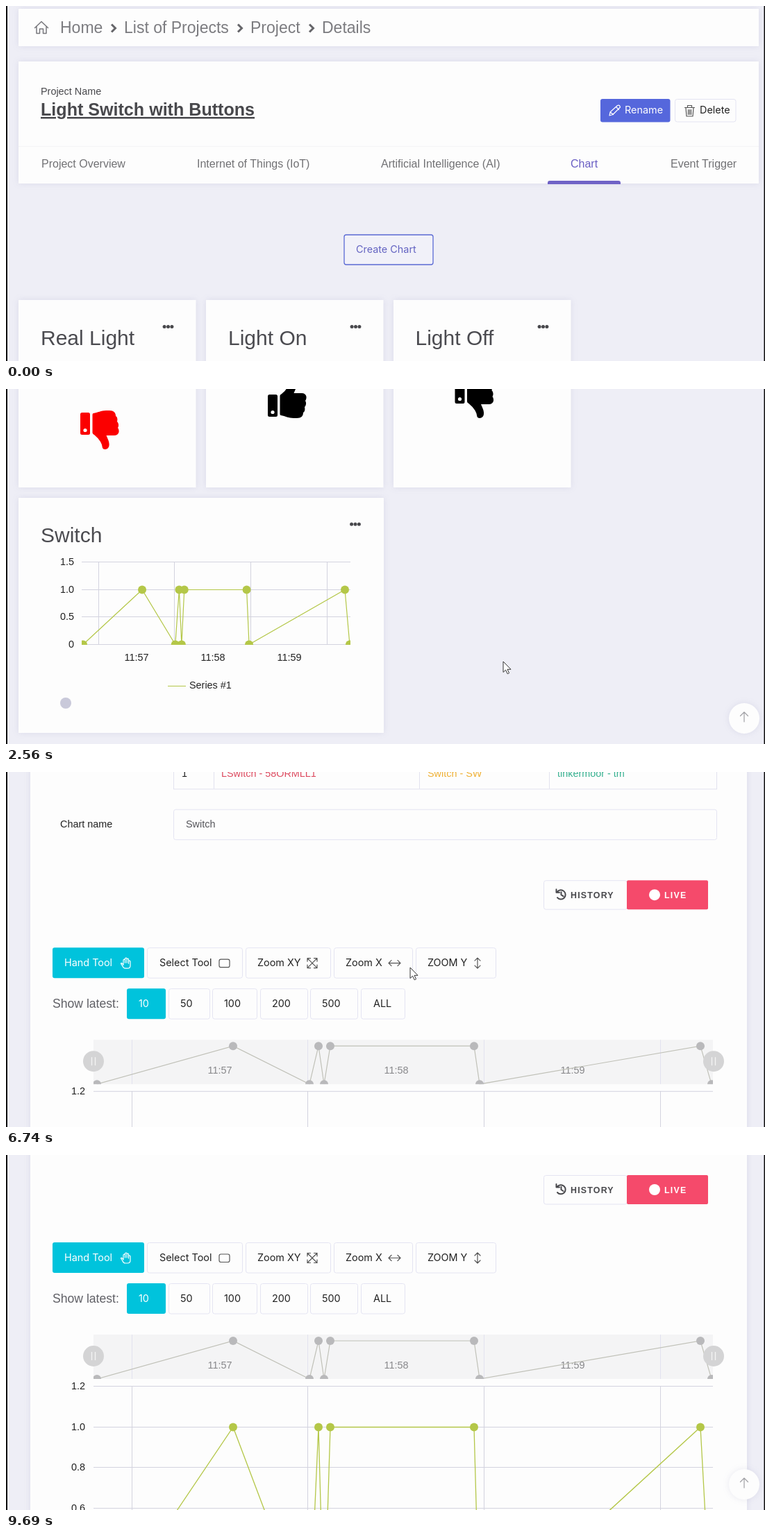
An HTML page for the animation above (9.79 s loop, 1093 by 512 pixels).

```html
<!DOCTYPE html>
<html lang="en">
<head>
<meta charset="utf-8">
<title>Project charts</title>
<style>
html, body { margin: 0; width: 100%; height: 100%; overflow: hidden; background: #eeeef6; }
svg { display: block; width: 1093px; height: 512px; }
text { font-family: "Liberation Sans", Arial, sans-serif; font-size: 14.4px; fill: #222; white-space: pre; }
.ui { font-family: Inter, "Open Sans", sans-serif; font-size: 14.4px; }
.crumb { font-size: 23px; fill: #7c7c80; }
.tab { font-size: 16px; fill: #717174; }
.title { font-size: 30px; fill: #4b4b50; }
.caps { font-weight: bold; font-size: 12.4px; letter-spacing: 1.2px; }
.end { text-anchor: end; }
.mid { text-anchor: middle; }
.card { fill: #fdfdfd; filter: drop-shadow(0 0 5px rgba(90, 90, 150, .12)); }
.box { fill: #fdfdfd; stroke: #e4e4f2; }
.line { fill: none; stroke: #e2e2ef; }
.grid { fill: none; stroke: #d3d3df; }
.icon { fill: none; stroke: #555; stroke-width: 1.2; stroke-linecap: round; stroke-linejoin: round; }

.page, .scroll, .wait, .ready, #spin, #cursor, #up { animation: 9790ms linear infinite; }
#a { animation-name: showA; animation-timing-function: step-end; }
#b { animation-name: showB; animation-timing-function: step-end; }
#a .scroll { animation-name: scrollA; }
#b .scroll { animation-name: scrollB; }
.wait { animation-name: wait; animation-timing-function: step-end; }
.ready { animation-name: ready; animation-timing-function: step-end; }
#spin { animation-name: spin; transform-origin: 456px 243px; }
#cursor { animation-name: cursor; }
#up { animation-name: up; }

@keyframes showA { 0% { opacity: 1 } 48%, 100% { opacity: 0 } }
@keyframes showB { 0% { opacity: 0 } 48%, 100% { opacity: 1 } }
@keyframes wait { 0% { opacity: 0 } 48% { opacity: 1 } 61%, 100% { opacity: 0 } }
@keyframes ready { 0% { opacity: 0 } 61%, 100% { opacity: 1 } }
@keyframes scrollA {
  0%, 9.9% { transform: translateY(0) }
  13.585% { transform: translateY(-152px) }
  24.5%, 100% { transform: translateY(-621px) }
}
@keyframes scrollB {
  0%, 62.3% { transform: translateY(-407px) }
  68.85% { transform: translateY(-74px); animation-timing-function: ease-out }
  73%, 88.5% { transform: translateY(0); animation-timing-function: ease-in-out }
  96.5%, 100% { transform: translateY(-201px) }
}
@keyframes spin { to { transform: rotate(5040deg) } }
@keyframes cursor {
  0%, .9% { transform: translate(740px, 515px); animation-timing-function: ease-out }
  5.8%, 30.6% { transform: translate(716px, 393px); animation-timing-function: ease-in-out }
  36.8%, 39.8% { transform: translate(503px, 195px); animation-timing-function: ease-in-out }
  44%, 97.5% { transform: translate(582px, 282px); opacity: 1 }
  97.6%, 100% { transform: translate(582px, 282px); opacity: 0 }
}
@keyframes up {
  0%, 19.5% { opacity: 0 }
  21.5%, 66.5% { opacity: 1 }
  68.4%, 92.5% { opacity: 0 }
  94.5%, 100% { opacity: 1 }
}
</style>
</head>
<body>
<svg id="stage" viewBox="0 0 1093 512"></svg>
<script>
const text = (x, y, s, cls = '', fill = '') =>
  `<text x="${x}" y="${y}" class="${cls}"${fill && ` style="fill:${fill}"`}>${s}</text>`;
const rect = (x, y, w, h, cls = 'box', extra = '') =>
  `<rect x="${x}" y="${y}" width="${w}" height="${h}" class="${cls}" ${extra}/>`;
const path = (d, cls = 'icon', extra = '') => `<path d="${d}" class="${cls}" ${extra}/>`;
const dot = (x, y, r, fill) => `<circle cx="${x}" cy="${y}" r="${r}" fill="${fill}"/>`;
const each = (list, fn) => list.map(fn).join('');
const range = (n, fn) => each([...Array(n).keys()], fn);

const green = '#b4c748';
const round = 'rx="3"';
const times = ['11:57', '11:58', '11:59'];

// Switch readings: position along the time axis and on/off value
const data = [[131, 0], [327, 1], [437, 0], [450, 1], [458, 0],
  [467, 1], [674, 1], [682, 0], [1000, 1], [1016, 0]];

function series(id, clip, toX, y0, y1, line, fill, width = 1.2) {
  const pts = data.map(([x, v]) => [toX(x), v ? y1 : y0]);
  return `<clipPath id="${id}"><rect x="${clip[0]}" y="${clip[1]}" width="${clip[2]}" height="${clip[3]}"/></clipPath>
    <g clip-path="url(#${id})">
    <polyline points="${pts.join(' ')}" fill="none" stroke="${line}" stroke-width="${width}"/>
    ${each(pts, p => dot(p[0], p[1], 6, fill))}</g>`;
}

const more = (x, y) => each([-5.4, 0, 5.4], d => dot(x + d, y, 2.5, '#48484c'));

function thumb(x, y, color, down) {
  const cuffY = down ? 3 : 22;
  return `<g transform="translate(${x} ${y})" fill="${color}">
    <rect y="${cuffY}" width="14" height="32" rx="2.5"/>
    ${dot(7, cuffY + 25.5, 2.6, '#fdfdfd')}
    <path ${down ? 'transform="matrix(1 0 0 -1 0 56)"' : ''}
      d="M17.500 24Q17.500 22 20 21Q25 17 29 11Q31 8 32 2Q33 0 35 0C42 0 43 7 40 14L37.500 20H49C56 20 57 27 54 31C56 34 55 38 53 40C54 44 53 47 51 48C51 53 48 56 42 56H37C30 56 25 53 19 52Q17.500 52 17.500 50Z"/></g>`;
}

function projectPage() {
  const head = rect(18, 4, 1066, 54, 'card')
    + path('M41.500 31.500L51 22.500L60.500 31.500M44 29.500V39.500H48.500V33H53.500V39.500H58V29.500', 'icon', 'style="stroke:#77777c;stroke-width:1.5"')
    + each([[78, 'Home'], [170, 'List of Projects'], [352, 'Project'], [455, 'Details']],
      ([x, s]) => text(x, 39, s, 'crumb'))
    + each([151, 333, 436], x => path(`M${x + 1} 26.500l5.500 5.500l-5.500 5.500`, 'icon', 'style="stroke:#66666a;stroke-width:3;stroke-linecap:butt;stroke-linejoin:miter"'));

  const project = rect(18, 80, 1066, 176, 'card')
    + text(50, 128, 'Project Name', '', '#48484c')
    + `<text x="50" y="158" style="font-size:25.1px;font-weight:bold;fill:#48484c;text-decoration:underline">Light Switch with Buttons</text>`
    + rect(856, 134, 100.5, 33.500, '', `${round} fill="#5567dc"`)
    + path('M869 158l1-5l10.500-9.500q3-1.500 4 2.500l-10.500 10.500zM870 153l4.500 3.500M878.500 145.500l4 4', 'icon', 'style="stroke:#fff"')
    + text(891, 155, 'Rename', 'ui', '#fff')
    + rect(963.5, 134.5, 87.5, 32.5, 'box', round)
    + path('M977.500 146.500h14M981.500 146v-2.500h6v2.500M979 147l1 12h9l1-12M982.500 149.500v7M984.500 149.500v7M986.500 149.500v7')
    + text(999, 155, 'Delete', 'ui')
    + path('M18 202.500H1084', 'line', 'style="stroke:#f4f4f5"')
    + each([[51, 'Project Overview'], [275, 'Internet of Things (IoT)'], [540, 'Artificial Intelligence (AI)'],
      [957, 'Event Trigger']], ([x, s]) => text(x, 233, s, 'tab'))
    + text(813, 233, 'Chart', 'tab', '#6a5fc4')
    + path('M780 257v-2q0-3 3-3h99q3 0 3 3v2z', '', 'fill="#6f62c6"')
    + rect(487, 330, 128, 43, '', `${round} fill="#f1f1f9" stroke="#5b6ad4" stroke-width="1.3"`)
    + text(504, 356, 'Create Chart', 'ui', '#6464c2');

  const cards = each([18, 288, 558], x => rect(x, 424, 255.5, 339, 'card') + more(x + 215.5, 462.5))
    + text(50, 489, 'Real Light', 'title') + text(50, 534, 'Switch', 'title')
    + text(320, 489, 'Light On', 'title') + text(589.5, 489, 'Light Off', 'title')
    + thumb(107, 652, '#fb0000', true) + thumb(377, 607, '#000') + thumb(646.5, 607, '#000', true);

  const chart = rect(18, 778, 526, 339, 'card') + more(503, 816)
    + text(50, 842, 'Switch', 'title')
    + each(['1.5', '1.0', '0.5', '0'], (s, i) => {
      const y = 870.5 + Math.round(i * 39.600);
      return text(98, y + 4.500, s, 'end') + path(`M109 ${y}H496`, 'grid');
    }, 0)
    + each([133.5, 242.5, 352.5, 462.5], x => path(`M${x} 870V990`, 'grid'))
    + each(times, (s, i) => text(188 + 110 * i, 1013, s, 'mid'))
    + series('small', [109, 865, 387, 125], x => 111 + (x - 131) / 2.305, 989.5, 910.5, green, green)
    + path('M233 1049.500H259', '', `stroke="${green}"`)
    + text(264, 1053, 'Series #1')
    + dot(86, 1074, 8, '#c9c9da');

  return head + project + cards + chart;
}

function chartPage() {
  const form = text(78, 37, 'Select Chart Source')
    + rect(241.5, 11.5, 782, 87, 'line')
    + path('M241 54.500H1023M299.500 11V98M595.500 11V98M782.500 11V98', 'line')
    + each([[253, '#'], [310, 'Topic'], [607, 'Data Type'], [794, 'Device']], ([x, s]) => text(x, 37, s))
    + text(253, 81, '1')
    + text(310, 81, 'LSwitch - 58ORMLL1', '', '#dd4b60')
    + text(607, 81, 'Switch - SW', '', '#efb034')
    + text(794, 81, 'tinkermoor - tm', '', '#35b08f')
    + text(78, 154, 'Chart name')
    + rect(241.5, 128, 782, 43.500, 'box', round)
    + text(259, 154, 'Switch', '', '#55555a');

  const mode = rect(774.5, 230.5, 120, 41.500, 'box', round)
    + path('M794 246.500a6.600 6.600 0 1 1 0 8.500M792.500 243v4.500h4.500M799.500 247v4l3 2', 'icon', 'style="stroke:#48484c;stroke-width:2"')
    + text(813, 256, 'HISTORY', 'caps', '#48484c')
    + rect(894, 230, 117, 42, '', 'rx="2" fill="#f54a6b"')
    + dot(934, 251, 8, '#fff')
    + text(948, 256, 'LIVE', 'caps', '#fff');

  const button = (y, [x, w, tx, s], i) => (i
    ? rect(x + .5, y + .5, w - 1, 43.500, 'box', round)
    : rect(x, y, w, 44, '', `${round} fill="#00c3dc"`))
    + text(tx, y + 27, s, 'ui', i ? '' : '#fff');
  const tools = each([[67, 132, 84, 'Hand Tool'], [203, 138, 221, 'Select Tool'], [345, 123, 362, 'Zoom XY'],
    [472, 114, 489, 'Zoom X'], [590, 116, 607, 'ZOOM Y']], (b, i) => button(327, b, i))
    + path('M169 352v-7q1.500-2 2.500 0v4v-6q1.500-2 2.500 0v6v-5q1.500-2 2.500 0v6v-3q1.500-2 2.500 0v6q0 4-4 4h-3q-3 0-4-3l-2.500-4q1-2 3.500 2', 'icon', 'style="stroke:#fff"')
    + rect(307, 344, 15, 11.500, 'icon', 'rx="2.5"')
    + path('M434 342.500l14 14M448 342.500l-14 14M434 347v-4.500h4.500M443.500 342.500h4.500v4.500M434 352v4.500h4.500M443.500 356.500h4.500v-4.500')
    + path('M551 349.500h17M555 345.500l-4 4l4 4M564 345.500l4 4l-4 4')
    + path('M679 342v15M675 346l4-4l4 4M675 353l4 4l4-4');
  const counts = `<text x="67" y="414" style="font-size:17.600px;fill:#606066">Show latest:</text>`
    + each([[174, 56, 191, '10'], [234, 60, 251, '50'], [297, 65, 314, '100'], [366, 69, 383, '200'],
      [438, 69, 455, '500'], [511, 64, 529, 'ALL']], (b, i) => button(386, b, i));

  const columns = [181.5, 434.5, 688.5, 942.5];
  const grip = x => dot(x, 491, 15, '#d4d4d5')
    + path(`M${x - 2.5} 485v12M${x + 2.5} 485v12`, '', 'stroke="#f4f4f4" stroke-width="1.3"');
  const overview = rect(126, 460, 892, 64, '', 'fill="#f4f4f5"')
    + each(columns, x => path(`M${x} 460V524`, 'line'))
    + each(times, (s, i) => text(308 + 254 * i, 509, s, 'mid', '#88888b'))
    + series('mini', [126, 460, 892, 64], x => x, 524, 469, '#c0c1b8', '#b9b9bb')
    + grip(126) + grip(1019);

  const rows = range(7, i => {
    const y = Math.round(534 + i * 58.500) + .5;
    return text(114, y + 4, i < 6 ? (1.2 - i * .2).toFixed(1) : '0', 'end') + path(`M126 ${y}H1018`, 'grid');
  });
  const main = rows + each(columns, x => path(`M${x} 534V885`, 'grid'))
    + series('large', [126, 534, 892, 351], x => x, 885, 593.5, green, green, 1.3);

  return `<g class="ready">${form}${mode}${tools}${counts}${overview}${main}</g>
    <g class="wait">${path('M114 884.500H1018', 'grid', 'style="stroke:#cfd0c6"')}</g>`;
}

const waiting = rect(0, 0, 1093, 512, '', 'fill="#505050" fill-opacity=".03"')
  + rect(325, 223, 160, 39.500, 'card', 'rx="4"')
  + text(342, 247, 'Please wait..', '', '#66666c')
  + `<g id="spin">${path('M449 229.800A15 15 0 0 1 471 244L468 243.500A13 13 0 0 0 449 229.800Z', '', 'fill="#2fb39b"')}</g>`;

document.getElementById('stage').innerHTML = `
  <rect width="1093" height="512" fill="#eeeef6"/>
  <g id="a" class="page"><g class="scroll">${projectPage()}</g></g>
  <g id="b" class="page">
    <rect width="1093" height="512" fill="#eeeef6"/>
    ${rect(35, -20, 1032, 560, 'card')}
    <g class="scroll">${chartPage()}</g>
    <g class="wait">${waiting}</g>
  </g>
  <g id="up"><circle cx="1063" cy="475" r="22" class="card"/>
    ${path('M1063 480v-14M1057.500 471.500l5.500-5.500l5.500 5.500', 'icon', 'style="stroke:#a0a0a4"')}</g>
  <g id="cursor">${path('M0 0V15.500L3.600 12.200L6.200 17.800L8.600 16.700L6 11.300H11Z', '', 'fill="#fff" stroke="#333" stroke-linejoin="round"')}</g>
  <path d="M0 0H2V512H0ZM1091.500 0H1093V512H1091.500Z" fill="#0c0c0c"/>`;
</script>
</body>
</html>
```
